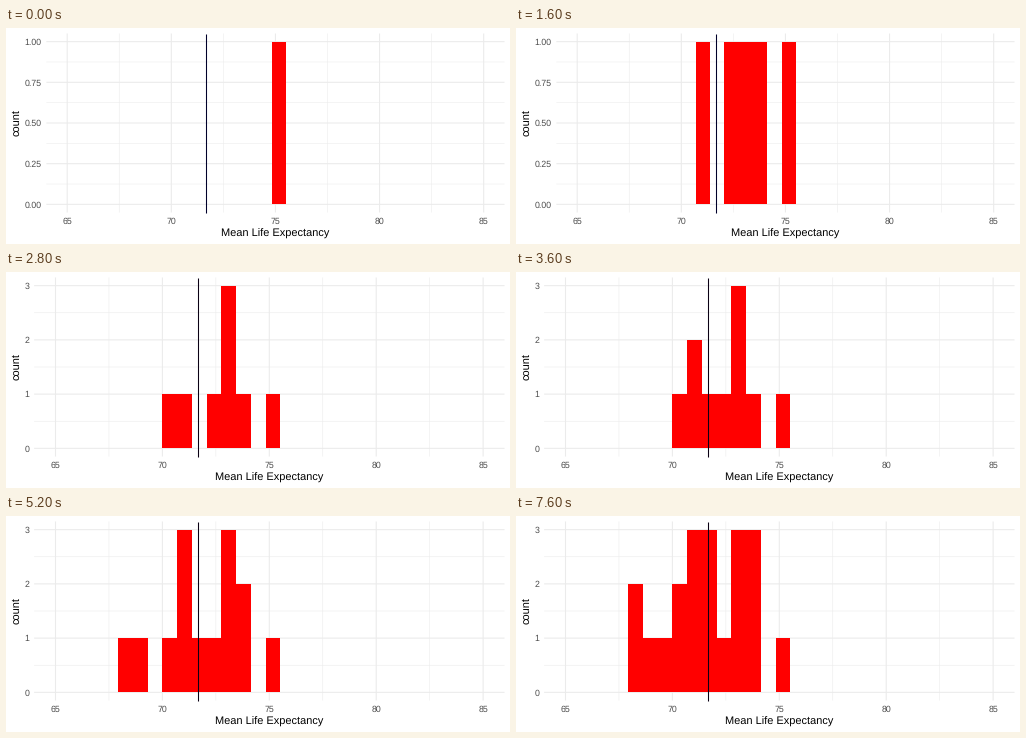
A matplotlib script that plays this animation: 504x216 px, repeating every 8000 ms.

```python
import matplotlib.pyplot as plt
import numpy as np
from matplotlib.animation import FuncAnimation
from matplotlib.patches import Rectangle

plt.rcParams.update({"font.family": "Liberation Sans", "text.hinting": "none"})

W, H = 504, 216
TOP, BOTTOM, RIGHT = 5.5, 184.5, 498.5
X_MIN, X_MAX = 64, 86
BIN = 20 / 29
MEAN = 71.65
GRID = "#ebebeb"

# Bin index of each sample mean, in order of arrival; one arrives per step.
DRAWS = [108, 104, 102, 106, 105, 105, 101, 105, 103, 102,
         98, 99, 106, 102, 101, 100, 106, 98, 103, 103]

# Highest count: panel left edge, tick step, tick format, mean line colour
LAYOUTS = {
    1: (40.38, 0.25, "{:.2f}", "#00002a"),
    2: (35.45, 0.5, "{:.1f}", "#0000ff"),
    3: (28.12, 1, "{:.0f}", "#0a0014"),
}

fig = plt.figure(figsize=(W / 72, H / 72), dpi=72, facecolor="white")
ax = fig.add_axes([0, 0, 1, 1])


def line(xs, ys, color, width, snap=False):
    ax.plot(xs, ys, color=color, lw=width, snap=snap,
            solid_capstyle="butt")


def label(x, y, text, size=8.8, color="#4d4d4d", ha="center", **kw):
    ax.text(x, y, text, size=size, color=color, ha=ha, va="baseline", **kw)


def draw(step):
    ax.clear()
    ax.set(xlim=(0, W), ylim=(H, 0))
    ax.axis("off")

    bins, counts = np.unique(DRAWS[:step + 1], return_counts=True)
    top = counts.max()
    left, tick, fmt, mean_color = LAYOUTS[top]

    def px(x):
        return left + (x - X_MIN) * (RIGHT - left) / (X_MAX - X_MIN)

    def py(y):
        return BOTTOM - (y / top + 0.05) * (BOTTOM - TOP) / 1.1

    x_major = np.arange(65, 86, 5)
    y_major = np.arange(0, top + tick / 2, tick)

    for width, xs, ys in ((0.53, x_major[:-1] + 2.5, y_major[:-1] + tick / 2),
                          (1.07, x_major, y_major)):
        for y in ys:
            line([left, RIGHT], [py(y)] * 2, GRID, width)
        for x in xs:
            line([px(x)] * 2, [TOP, BOTTOM], GRID, width)

    for n, count in zip(bins, counts):
        x0, x1 = np.round([px((n + 0.5) * BIN), px((n + 1.5) * BIN)])
        y0, y1 = np.round([py(0), py(count)])
        ax.add_patch(Rectangle((x0, y1), x1 - x0, y0 - y1,
                               fc="red", lw=0, zorder=3))

    ax.plot([np.floor(px(MEAN)) + 0.5] * 2, [TOP, BOTTOM], color=mean_color,
            lw=1.07, solid_capstyle="butt", zorder=4)

    for x in x_major:
        label(px(x), 195.9, str(x))
    for y in y_major:
        label(left - 4.95, py(y) + 3.15, fmt.format(y), ha="right")
    label((left + RIGHT) / 2, 208.9, "Mean Life Expectancy", 11, "black")
    label(13.4, (TOP + BOTTOM) / 2, "count", 11, "black",
          rotation=90, rotation_mode="anchor")


anim = FuncAnimation(fig, draw, frames=len(DRAWS), interval=400,
                     repeat=True, repeat_delay=0)
plt.show()
```
